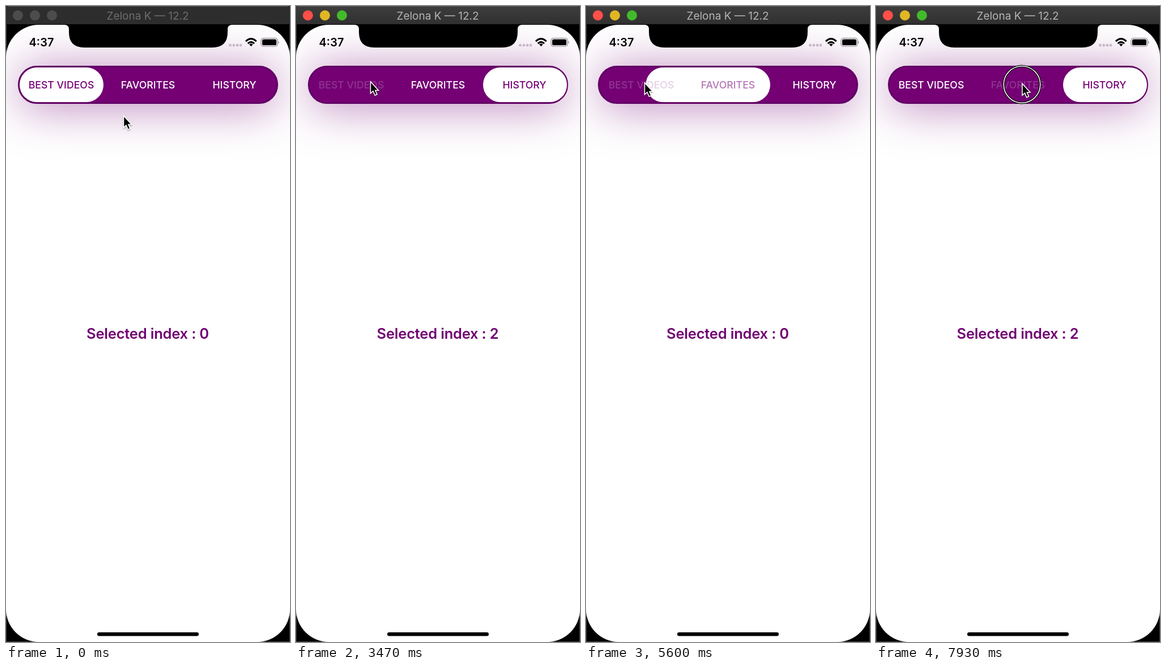
Recreate the animation shown at these times as an HTML page. Size 501 by 1118 pixels, loop 8000 ms.

```html
<!DOCTYPE html>
<html lang="en">
<head>
<meta charset="utf-8">
<title>Segmented control</title>
<style>
  html, body { margin: 0; width: 100%; height: 100%; overflow: hidden; background: #000; }
  svg { display: block; width: 501px; height: 1118px; font-family: Inter, sans-serif; }
  text { text-anchor: middle; white-space: pre; }
  .glow {
    position: absolute; left: 21px; top: 105px; width: 459px; height: 67px;
    border-radius: 34px; box-shadow: 0 5px 80px rgba(115, 0, 115, .5);
  }
</style>
</head>
<body>
<svg viewBox="0 0 501 1118">
  <defs>
    <linearGradient id="bar" x2="0" y2="1">
      <stop stop-color="#3d3d3d"/><stop offset="1" stop-color="#303030"/>
    </linearGradient>
    <clipPath id="screen"><rect y="33" width="501" height="1085" rx="58"/></clipPath>
    <filter id="shade" x="-50%" y="-50%" width="200%" height="200%">
      <feDropShadow dx="0" dy="1.5" stdDeviation="1.2" flood-opacity=".4"/>
    </filter>
  </defs>

  <rect x=".5" y=".5" width="500" height="1117" stroke="#444"/>
  <rect id="titleBar" width="501" height="32"/>
  <path d="M4 .5H497" stroke="#5c5c5c"/>
  <g id="lights"><circle cx="21" cy="16.5" r="9"/><circle cx="51" cy="16.5" r="9"/><circle cx="81" cy="16.5" r="9"/></g>
  <text id="title" x="250" y="24" font-size="19">Zelona K — 12.2</text>

  <g clip-path="url(#screen)">
    <rect y="33" width="501" height="1085" fill="#fff"/>
    <foreignObject width="501" height="1118"><div class="glow" xmlns="http://www.w3.org/1999/xhtml"></div></foreignObject>
  </g>
  <path d="M103 32V33Q111 33 111 41V46Q111 73 138 73H364Q391 73 391 46V41Q391 33 399 33V32Z"/>

  <text x="62.5" y="70.5" font-size="20" font-weight="600">4:37</text>
  <g fill="#c5b9c7"><circle cx="395.5" cy="69" r="2.4"/><circle cx="401.8" cy="69" r="2.4"/><circle cx="408" cy="69" r="2.4"/><circle cx="414" cy="69" r="2.4"/></g>
  <g fill="none" stroke="#000" stroke-width="3">
    <path d="M423 62.2Q432.3 53.2 441.6 62.2M426.6 66Q432.3 60.6 438 66"/>
    <path d="M429 67.6Q432.3 65 435.6 67.6L432.3 71Z" fill="#000" stroke="none"/>
  </g>
  <rect x="450" y="56.5" width="29" height="14.5" rx="4.2" fill="none" stroke="#8a838b" stroke-width="1.2"/>
  <rect x="452" y="58.5" width="25" height="10.5" rx="2.6"/>
  <path d="M480.3 61.3Q483 63.7 480.3 66.2Z" fill="#8a838b"/>

  <rect x="22.5" y="106.5" width="456" height="64" rx="32" fill="#740074" stroke="#610064" stroke-width="3"/>
  <rect id="pill" y="108" height="61" rx="30.5" fill="#fff"/>
  <g id="labels" font-size="17.7" font-weight="500">
    <text x="97.5" y="145">BEST VIDEOS</text>
    <text x="250.5" y="145">FAVORITES</text>
    <text x="403" y="145">HISTORY</text>
  </g>
  <text id="index" x="250" y="585" font-size="25.5" font-weight="600" letter-spacing="-.2" fill="#700072"></text>
  <rect x="161" y="1101" width="179" height="6.5" rx="3.2"/>

  <g id="cursor">
    <g id="ring" fill="none">
      <circle cy="2.5" r="32.3" stroke="#000" stroke-width="4"/>
      <circle cy="2.5" r="32.3" stroke="#fff" stroke-width="1.6"/>
    </g>
    <path d="M.5 1V21.5L5 17.4L8.3 25L12 23.4L8.8 16.2H14.5Z" stroke="#fff" stroke-width="1.5" filter="url(#shade)"/>
  </g>
</svg>
<script>
const LOOP = 8000, TICK = 1000 / 15;
const EDGE = 180;             // travel time of each pill edge
const SLOT = 153, PILL_X = 24, PILL_W = 148;
const START = { x: 207, y: 192 };
const TAPS = [
  { slot: 1, x: 243, y: 132, down: 670, up: 880 },
  { slot: 2, x: 395, y: 128, down: 1985, up: 2180 },
  { slot: 0, x: 131, y: 132, down: 3260, up: 3480 },
  { slot: 1, x: 231, y: 132.5, down: 4385, up: 4600 },
  { slot: 0, x: 103, y: 134, down: 5310, up: 5513 },
  { slot: 2, x: 388, y: 133.5, down: 6585, up: 6800 },
  { slot: 1, x: 257.5, y: 135.5, down: 7730, up: 8050 }
];

const $ = id => document.getElementById(id);
const labels = [...$('labels').children];
const lights = [...$('lights').children];
const mix = (a, b, k) => a + (b - a) * k;
const ease = (t, start, length) => {
  const k = Math.min(1, Math.max(0, (t - start) / length));
  return k < .5 ? 2 * k * k : 1 - 2 * (1 - k) ** 2;
};

function cursorAt(t) {
  let pos = START;
  TAPS.forEach((tap, i) => {
    const start = i ? TAPS[i - 1].up + 150 : 40;
    const end = i ? tap.down - 60 : 470;
    const k = ease(t, start, end - start);
    pos = { x: mix(pos.x, tap.x, k), y: mix(pos.y, tap.y, k) };
  });
  return pos;
}

function draw(t) {
  const active = t >= TAPS[0].down;
  $('titleBar').setAttribute('fill', active ? 'url(#bar)' : '#2d2d2d');
  $('title').setAttribute('fill', active ? '#b5b5b5' : '#6d6d6d');
  lights.forEach((light, i) =>
    light.setAttribute('fill', active ? ['#ff4f49', '#e1b625', '#43ba2b'][i] : '#4c4c4c'));

  const done = TAPS.filter(tap => t >= tap.up);
  const last = done.at(-1);
  const to = last ? last.slot : 0;
  const from = done.length > 1 ? done.at(-2).slot : 0;
  const lead = last ? ease(t, last.up, EDGE) : 1;
  const trail = last ? ease(t, last.up + EDGE, EDGE) : 1;
  const a = mix(from, to, lead), b = mix(from, to, trail);
  $('pill').setAttribute('x', PILL_X + SLOT * Math.min(a, b));
  $('pill').setAttribute('width', PILL_W + SLOT * Math.abs(a - b));
  $('index').textContent = 'Selected index : ' + to;

  labels.forEach((label, slot) => {
    const chosen = mix(+(slot === from), +(slot === to), lead);
    const green = mix(255, 0, chosen), red = mix(255, 116, chosen);
    label.setAttribute('fill', `rgb(${red},${green},${red})`);
    const opacity = TAPS.filter(tap => tap.slot === slot).reduce((o, tap) =>
      o - .8 * (ease(t, tap.down, 150) - ease(t, tap.up, 250)), 1);
    label.setAttribute('opacity', opacity);
  });

  const { x, y } = cursorAt(t);
  $('cursor').setAttribute('transform', `translate(${x} ${y})`);
  const pressed = TAPS.some(tap => t >= tap.down && t < tap.up - 30);
  $('ring').setAttribute('visibility', pressed ? 'visible' : 'hidden');
}

function frame() {
  const t = performance.now() % LOOP;
  draw(Math.floor((t + 5) / TICK) * TICK % LOOP);
  requestAnimationFrame(frame);
}
frame();
</script>
</body>
</html>
```
